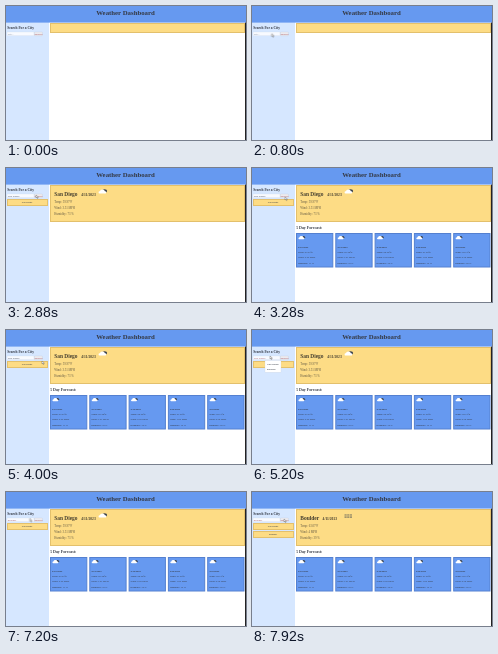
Write an HTML page that moves like this. It is 240 px wide and 134 px high and loops after 8 s.

```html
<!DOCTYPE html>
<html lang="en">
<head>
<meta charset="utf-8">
<title>Weather Dashboard</title>
<style>
html, body { margin: 0; width: 100%; height: 100%; overflow: hidden; background: #fff; }
svg { display: block; width: 100vw; height: 100vh; }
text { font-family: "Liberation Serif", "Times New Roman", serif; fill: #343944; white-space: pre; }
.bold { font-weight: bold; }
.mid { text-anchor: middle; }
.small { font-size: 2.5px; }
.info { font-size: 3px; fill: #655c45; }
.city { fill: #453f30; }
.ui { font-family: "Liberation Sans", Arial, sans-serif; font-size: 2.5px; }
.gold { fill: #fddc85; stroke: #e3c06c; }
.blue { fill: #6699f0; stroke: #5480d0; }

/* 1% of the loop is 80 ms */
.anim { animation: 8s infinite step-end; }
#bar { animation-name: bar; }
#first { animation-name: first; }
#button1 { animation-name: button1; }
#forecast { animation-name: forecast; }
#menu { animation-name: menu; }
#second { animation-name: second; }
#pointer { animation-name: pointer; }
#pointer path { animation: point 8s infinite ease-in-out; }
@keyframes bar { 0% { visibility: visible } 25%, 100% { visibility: hidden } }
@keyframes first { 0% { visibility: hidden } 25% { visibility: visible } 97%, 100% { visibility: hidden } }
@keyframes button1 { 0% { visibility: hidden } 25%, 100% { visibility: visible } }
@keyframes forecast { 0% { visibility: hidden } 37%, 100% { visibility: visible } }
@keyframes menu { 0% { visibility: hidden } 62% { visibility: visible } 68%, 100% { visibility: hidden } }
@keyframes second { 0% { visibility: hidden } 97%, 100% { visibility: visible } }
@keyframes pointer { 0% { visibility: hidden } 1%, 100% { visibility: visible } }
@keyframes point {
  0%, 1% { transform: translate(104px, 60px) }
  11%, 17% { transform: translate(18px, 27px) }
  21%, 36% { transform: translate(30px, 27px) }
  46%, 56% { transform: translate(36px, 31px) }
  64%, 86% { transform: translate(18px, 26px) }
  95%, 100% { transform: translate(32px, 27px) }
}
</style>
</head>
<body>
<svg viewBox="0 0 240 134" preserveAspectRatio="none">
  <defs>
    <g id="cloud">
      <ellipse cx="6" cy="2.2" rx="2.3" ry="1.5" fill="#39414d"/>
      <ellipse cx="4" cy="2.5" rx="2.2" ry="1.7" fill="#fff"/>
      <rect x=".5" y="2.6" width="7" height="2" rx="1" fill="#fff"/>
    </g>
  </defs>

  <rect width="240" height="134" fill="#fff"/>
  <rect y="16" width="43" height="118" fill="#d6e7ff"/>
  <rect width="240" height="16.6" fill="#6699f0"/>
  <rect x="239" y="16.6" width="1" height="117.4" fill="#222"/>
  <text class="bold mid" x="119.5" y="9.2" font-size="6.8">Weather Dashboard</text>

  <text class="bold" x="1.2" y="22.9" font-size="3.55">Search For a City</text>
  <rect x="1" y="26" width="27" height="3.7" fill="#f8faff" stroke="#c8d2e2" stroke-width=".25"/>
  <text class="ui" id="field" x="1.7" y="28.7"></text>
  <rect x="28.4" y="26" width="8" height="3.7" rx=".4" fill="#ecebf0" stroke="#b9bdc9" stroke-width=".25"/>
  <text class="ui mid" x="32.4" y="28.6" font-size="2.2" style="fill:#a9565e">Search</text>

  <g id="button1" class="anim">
    <rect class="gold" x="1.5" y="31.5" width="40" height="6"/>
    <text class="small mid" x="21" y="35.4">San Diego</text>
  </g>

  <rect id="bar" class="anim gold" x="44.5" y="17.5" width="194" height="9"/>

  <g id="first" class="anim">
    <rect class="gold" x="44.5" y="17.5" width="194" height="36"/>
    <text class="bold city" x="48.3" y="28" font-size="5.4">San Diego</text>
    <text class="bold city" x="75.3" y="27.6" font-size="3.6">4/11/2023</text>
    <use href="#cloud" transform="translate(92 20.5) scale(1.1)"/>
    <text class="info" x="48.3" y="34.8">Temp: 59.97°F</text>
    <text class="info" x="48.3" y="40.7">Wind: 3.51 MPH</text>
    <text class="info" x="48.3" y="46.6">Humidity: 73 %</text>
  </g>

  <g id="forecast" class="anim">
    <text class="bold" x="44.2" y="60.8" font-size="3.9">5 Day Forecast:</text>
    <g id="days"></g>
  </g>

  <g id="second" class="anim">
    <rect class="gold" x="1.5" y="39.5" width="40" height="6"/>
    <text class="small mid" x="21" y="43.3">Boulder</text>
    <rect class="gold" x="44.5" y="17.5" width="194" height="36"/>
    <text class="bold city" x="48.3" y="28" font-size="5.5">Boulder</text>
    <text class="bold city" x="70.6" y="27.6" font-size="3.6">4/11/2023</text>
    <path d="M92.5 22.8h7.5M92.5 24.1h7.5M92.5 25.4h7.5" stroke="#7b7763" stroke-width=".8" stroke-dasharray="2.2 .5"/>
    <text class="info" x="48.3" y="34.8">Temp: 63.07°F</text>
    <text class="info" x="48.3" y="40.7">Wind: 4 MPH</text>
    <text class="info" x="48.3" y="46.6">Humidity: 39 %</text>
  </g>

  <g id="menu" class="anim">
    <rect x="13" y="30.5" width="16" height="11.7" fill="#fff" stroke="#c5cad4" stroke-width=".25"/>
    <text class="ui" x="15" y="34.8">San Diego</text>
    <text class="ui" x="15" y="40.4">Boulder</text>
  </g>

  <g id="pointer" class="anim">
    <path d="M0 0v3l.8-.7.6 1.2.6-.3-.6-1.1h1z" fill="#fff" stroke="#222" stroke-width=".3"/>
  </g>
</svg>
<script>
const LOOP = 8000;
const days = document.getElementById('days');
const field = document.getElementById('field');

const label = (x, y, s, style = '') => `<text class="small ${style}" x="${x}" y="${y}">${s}</text>`;

days.innerHTML = Array.from({ length: 5 }, (_, i) => {
  const x = 44.5 + i * 39.3;
  return `<rect class="blue" x="${x}" y="65.5" width="36.3" height="33.5"/>
    <use href="#cloud" transform="translate(${x + 1.5} 67.3) scale(.85)"/>` +
    label(x + 1.5, 79.6, `4/${12 + i}/2023`, 'bold') +
    label(x + 1.5, 84.9, `Temp: ${57 + i * 3 % 5}.${27 + i * 11}°F`) +
    label(x + 1.5, 90.3, `Wind: ${5 + i * 2 % 4}.${42 + i * 9} MPH`) +
    label(x + 1.5, 95.8, `Humidity: ${71 + i * 4 % 9} %`);
}).join('');

// Times at which each next letter appears
const firstKeys = [960, 1000, 1040, 1120, 1160, 1200, 1280, 1320, 1360];
const secondKeys = [5600, 5760, 5920, 6080, 6480, 6560, 6720];

function typed(word, keys, t) {
  return word.slice(0, keys.filter(k => k <= t).length);
}

function entry(t) {
  return t < 5440 ? typed('San Diego', firstKeys, t) : typed('Boulder', secondKeys, t);
}

let start;
function draw(now) {
  start ??= now;
  const t = (now - start) % LOOP;
  const text = entry(t);
  field.textContent = text || 'City...';
  field.style.fill = !text ? '#8996a8' : t < 4480 ? '#59616e' : '#b0707c';
  requestAnimationFrame(draw);
}
requestAnimationFrame(draw);
</script>
</body>
</html>
```
